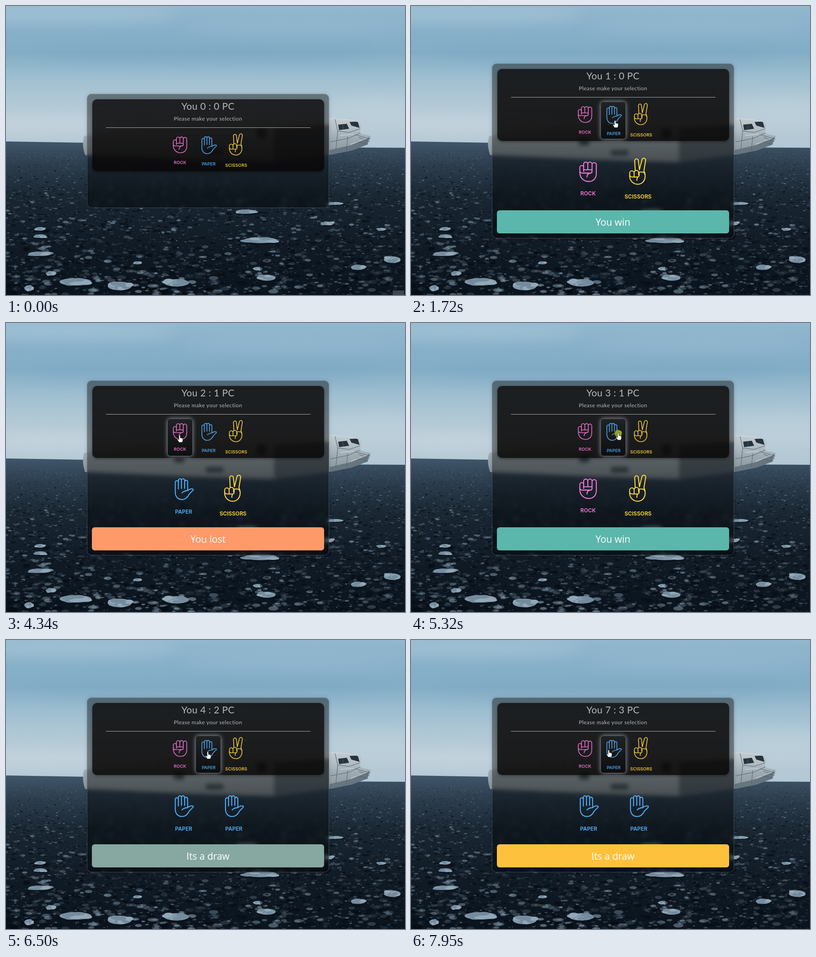
An HTML page with a canvas that plays this animation: 878x638 px, repeating every 8 s.

```html
<!DOCTYPE html>
<html lang="en">
<head>
<meta charset="utf-8">
<title>Rock Paper Scissors</title>
<style>
html, body { margin: 0; width: 100%; height: 100%; overflow: hidden; background: #0d1621; }
#stage { position: relative; width: 878px; height: 638px; overflow: hidden; }
#stage * { position: absolute; box-sizing: border-box; }
#card {
  left: 178px; width: 533px; border-radius: 10px;
  background: rgba(0, 0, 0, .42); backdrop-filter: blur(5px);
  box-shadow: inset 0 0 0 1px rgba(170, 190, 200, .3), 0 0 9px rgba(0, 0, 0, .15);
}
#panel {
  left: 12px; top: 12px; width: 510px; height: 159px; border-radius: 10px;
  background: linear-gradient(rgba(10, 9, 9, .78), rgba(8, 6, 6, .83));
  box-shadow: 0 2px 7px rgba(0, 0, 0, .4);
}
.line { left: 0; width: 533px; text-align: center; color: #b4b8be; white-space: pre; }
#score { top: 12px; font: 21px/30px Lato, sans-serif; letter-spacing: .4px; }
#hint { top: 46px; font: 12px/18px Lato, sans-serif; letter-spacing: .35px; }
#rule { left: 42px; top: 74px; width: 450px; height: 1px; background: #a2abb0; }
#hover {
  top: 85px; width: 54px; height: 81px; border-radius: 6px;
  background: linear-gradient(#202224, #0c0e10);
  box-shadow: 0 0 10px 1px rgba(200, 210, 222, .65);
}
#bar {
  left: 11px; top: 324px; width: 511px; height: 51px; border-radius: 6px;
  font: 500 21px/52px "Open Sans", "Noto Sans", sans-serif; font-stretch: 75%;
  text-align: center; color: #fff;
}
svg { left: 0; top: 0; width: 878px; height: 638px; overflow: visible; }
.hand { fill: none; stroke-width: 1.7; stroke-linecap: round; stroke-linejoin: round; }
.hand text { stroke: none; font: 600 9.6px Inter, sans-serif; text-anchor: middle; }
</style>
</head>
<body>
<div id="stage">
  <canvas id="scene" width="878" height="638"></canvas>
  <div id="card">
    <div id="panel"></div>
    <div id="score" class="line"></div>
    <div id="hint" class="line">Please make your selection</div>
    <div id="rule"></div>
    <div id="hover"></div>
    <svg>
      <defs>
        <g id="rock" class="hand" stroke="#fb78da">
          <path d="M19 27V14a3.7 3.7 0 0 1 7.5 0V24M26.5 14a3.7 3.7 0 0 1 7.6 0V24M34.1 15a3.7 3.7 0 0 1 7.6 0V31c0 9-6 14-14 14s-15-6-15.5-15V20a3.5 3.5 0 0 1 7 0M12.2 27q1 3 5 3H31q3 0 3-3V24H19M31 30q-6 1-6 7"/>
          <text x="27" y="69.6" fill="#fb78da">ROCK</text>
        </g>
        <g id="paper" class="hand" stroke="#4fb0fb">
          <path d="M13 34V16a2.7 2.7 0 0 1 5.5 0V28M18.5 16V12.5a2.8 2.8 0 0 1 5.6 0V27M24.1 12.5a2.8 2.8 0 0 1 5.6 0V27M29.7 15a2.7 2.7 0 0 1 5.4 0V31q4-4 9-3 2 1 0 3l-6 6q-5 10-13 10c-8 0-12-6-12.1-13M35 31q-6 0-10 4"/>
          <text x="28" y="72.6" fill="#4fb0fb">PAPER</text>
        </g>
        <g id="scissors" class="hand" stroke="#ffd93c">
          <path d="M21.5 26L20.5 8a3.3 3.3 0 0 1 6.6-.5L29 24 33.5 6a3.3 3.3 0 0 1 6.6 1.2L37 26q3 5 2 12c-1 7-6 12-13 12S12 45 11.5 36V30a4 4 0 0 1 8 0v6M19.5 29a4 4 0 0 1 8 0v4M11.5 33q0 4 5 4h9q3 0 3-4V28H34q4 0 5 5M26 37q-2 2-1.5 6"/>
          <text x="26.5" y="75.6" fill="#ffd93c">SCISSORS</text>
        </g>
      </defs>
      <g opacity=".88">
        <use href="#rock" x="178" y="85"/>
        <use href="#paper" x="240" y="85"/>
        <use href="#scissors" x="302" y="85"/>
      </g>
      <g id="result">
        <use id="mine" transform="translate(178.5 205) scale(1.23)"/>
        <use id="theirs" transform="translate(289 205) scale(1.23)"/>
      </g>
    </svg>
    <div id="bar"></div>
  </div>
  <svg>
    <rect id="corner" x="851" y="628" width="25" height="10" fill="#4a545c" opacity=".8"/>
    <g id="cursor">
      <circle id="ring" r="8" cy="1" fill="#b4c000" opacity=".75"/>
      <g fill="#fff" stroke="#222" stroke-width=".8" stroke-linejoin="round">
        <path id="arrow" d="M0 0V14l3.2-3 2.3 5 2.2-1-2.2-4.8H10z"/>
        <path id="pointer" d="M-1.5 1a1.5 1.5 0 0 1 3 0V6l1-.5 1.5.5 1.5.3 1.5.7V12l-1.5 3.5h-6.5L-5 9.5q0-1.5 1.5-1l2 1.5z"/>
      </g>
    </g>
  </svg>
</div>
<script>
const $ = id => document.getElementById(id);
const g = $('scene').getContext('2d');

let seed = 7;
const rand = () => (seed = (seed * 16807) % 2147483647) / 2147483647;

function shade(y0, y1, ...colors) {
  const grad = g.createLinearGradient(0, y0, 0, y1);
  colors.forEach((c, i) => grad.addColorStop(i / (colors.length - 1), c));
  return grad;
}

function shape(d, fill) {
  g.fillStyle = fill;
  g.fill(new Path2D(d));
}

function blob(x, y, w, h, fill) {
  g.fillStyle = fill;
  g.beginPath();
  g.ellipse(x, y, w, h, 0, 0, 7);
  g.fill();
}

function drawSky() {
  g.fillStyle = shade(0, 310, '#93b8cf', '#87b0c9', '#83adc6', '#9dbed0', '#b0c8d5', '#b9ccd7', '#b3c8d5');
  g.fillRect(0, 0, 878, 320);
  g.filter = 'blur(16px)';
  blob(120, 20, 260, 16, 'rgba(190,212,224,.4)');
  blob(640, 50, 260, 14, 'rgba(165,196,214,.4)');
  blob(430, 110, 360, 16, 'rgba(115,160,188,.3)');
  blob(90, 262, 200, 22, 'rgba(205,217,226,.5)');
  blob(820, 230, 130, 30, 'rgba(196,213,223,.4)');
  g.filter = 'none';
}

function drawGround() {
  shape('M0 299L180 302 700 312 878 313V638H0z',
    shade(299, 638, '#40566a', '#2b3c4c', '#1b2935', '#15212c', '#101b26', '#0d1721', '#0a141e'));
  g.filter = 'blur(.5px)';
  for (let i = 0; i < 6500; i++) {
    const y = 322 + 316 * rand() ** 1.25, depth = (y - 305) / 333;
    const w = .7 + depth * 10 * rand() ** 3 + depth, v = rand();
    const fill = v < .4 ? 'rgba(5,11,18,.55)'
      : `rgba(${90 + v * 60},${112 + v * 60},${130 + v * 60},${.12 + .5 * rand() ** 2})`;
    blob(rand() * 878, y, w, w * .42, fill);
  }
  const stones = [
    [153, 609, 44, 10], [250, 618, 33, 12], [375, 611, 34, 10], [574, 600, 24, 8],
    [50, 623, 12, 8], [75, 492, 14, 5], [75, 547, 32, 6], [528, 454, 28, 6],
    [725, 436, 22, 4], [850, 560, 23, 9], [775, 577, 20, 7], [552, 580, 9, 5],
    [826, 493, 12, 4], [708, 480, 17, 5], [560, 517, 46, 8], [290, 567, 12, 4],
    [100, 590, 14, 6], [76, 508, 16, 5]];
  for (const [x, y, w, h] of stones) {
    blob(x, y + h * .5, w, h * .8, '#0a131c');
    blob(x, y, w * .8, h * .8, '#8198a9');
    for (let i = 0; i < 7; i++)
      blob(x + (rand() - .5) * w * 1.4, y + (rand() - .5) * h, w * .3, h * .4, i % 2 ? '#92a8b7' : '#748b9d');
  }
  g.filter = 'none';
}

function drawPlane() {
  shape('M172 287Q300 264 480 254T712 247L745 249 778 254 782 265 778 281 803 287 796 306 760 319 714 328 590 345 400 339 174 329Q166 305 172 287z',
    shade(247, 345, '#c3ccd1', '#b2bdc4', '#9ba8b0', '#8f9aa0', '#7c868c'));
  shape('M590 270L711 262V329L590 345z', 'rgba(50,62,72,.55)');
  shape('M370 292h22v16h-22zM440 318h38v12h-38zM552 270h20v22h-20z', '#45545d');
  shape('M731 262l19-2 5 11-22 3zM756 256l18-1 4 14-18-5z', '#26343e');
  shape('M712 318l48-11 40-18-5 17-34 13-49 10z', '#66757f');
  g.strokeStyle = '#52636f';
  g.stroke(new Path2D('M714 300l40-8 26-12M730 276l25 3 24-8M724 250l6 26-4 40M752 288l-3 30M768 284l34 10M776 290l24 9M772 299l24 6M741 263l1 10'));
  g.strokeStyle = '#d8e0e4';
  g.stroke(new Path2D('M714 249l40 2 22 5M735 286l30-3M759 305l36-13'));
}

drawSky();
drawGround();
drawPlane();

const WIN = ['You win', '#5bb6ab'], LOST = ['You lost', '#fe996a'];
// time, mine, theirs, score, verdict
const rounds = [
  [950, 'rock', 'scissors', '1 : 0', WIN],
  [1990, 'paper', 'rock', '2 : 0', WIN],
  [3850, 'paper', 'scissors', '2 : 1', LOST],
  [4480, 'rock', 'scissors', '3 : 1', WIN],
  [5380, 'paper', 'scissors', '3 : 2', LOST],
  [5850, 'paper', 'rock', '4 : 2', WIN],
  [6300, 'paper', 'paper', '4 : 2', ['Its a draw', '#86a8a0']],
  [6650, 'paper', 'rock', '5 : 2', WIN],
  [6950, 'paper', 'rock', '6 : 2', WIN],
  [7250, 'paper', 'rock', '7 : 2', WIN],
  [7530, 'paper', 'scissors', '7 : 3', LOST],
  [7790, 'paper', 'paper', '7 : 3', ['Its a draw', '#fdc13d']]];

// time, x, y of the cursor tip
const path = [
  [70, 890, 645], [780, 385, 312], [1080, 385, 312], [1500, 451, 250], [1720, 449, 253],
  [2200, 449, 253], [2640, 513, 255], [2760, 513, 255], [2880, 503, 370], [3080, 384, 262],
  [3340, 513, 250], [3520, 511, 250], [3740, 452, 250], [4000, 450, 250], [4280, 382, 248],
  [4600, 382, 248], [5000, 454, 245], [5250, 456, 243], [5500, 456, 243], [6200, 446, 248],
  [6500, 444, 247], [7700, 436, 244], [8000, 435, 243]];

function tip(t) {
  const i = path.findIndex(p => p[0] > t);
  if (i < 1) return path[0].slice(1);
  const [t0, x0, y0] = path[i - 1], [t1, x1, y1] = path[i];
  let k = (t - t0) / (t1 - t0);
  k *= k * (3 - 2 * k);
  return [x0 + (x1 - x0) * k, y0 + (y1 - y0) * k];
}

const show = (id, on) => $(id).style.display = on ? '' : 'none';

function render(t) {
  const round = rounds.findLast(r => t >= r[0]);
  const top = round ? 127 : 194;
  $('card').style.top = top + 'px';
  $('card').style.height = (round ? 386 : 252) + 'px';
  show('result', round);
  show('bar', round);
  $('score').textContent = `You ${round ? round[3] : '0 : 0'} PC`;
  if (round) {
    const [, mine, theirs, , [text, color]] = round;
    $('mine').setAttribute('href', '#' + mine);
    $('theirs').setAttribute('href', '#' + theirs);
    $('bar').textContent = text;
    $('bar').style.background = color;
  }

  const [x, y] = tip(t);
  const left = [356, 418, 480].find(b => x >= b && x < b + 54 && y >= top + 85 && y < top + 166);
  show('hover', left);
  if (left) $('hover').style.left = left - 178 + 'px';
  show('pointer', left);
  show('arrow', !left);
  show('ring', rounds.some(r => t > r[0] - 80 && t < r[0] + 130));
  show('corner', t < 70);
  $('cursor').setAttribute('transform', `translate(${x} ${y})`);
}

const start = performance.now();
function frame() {
  render((performance.now() - start) % 8000);
  requestAnimationFrame(frame);
}
frame();
</script>
</body>
</html>
```
